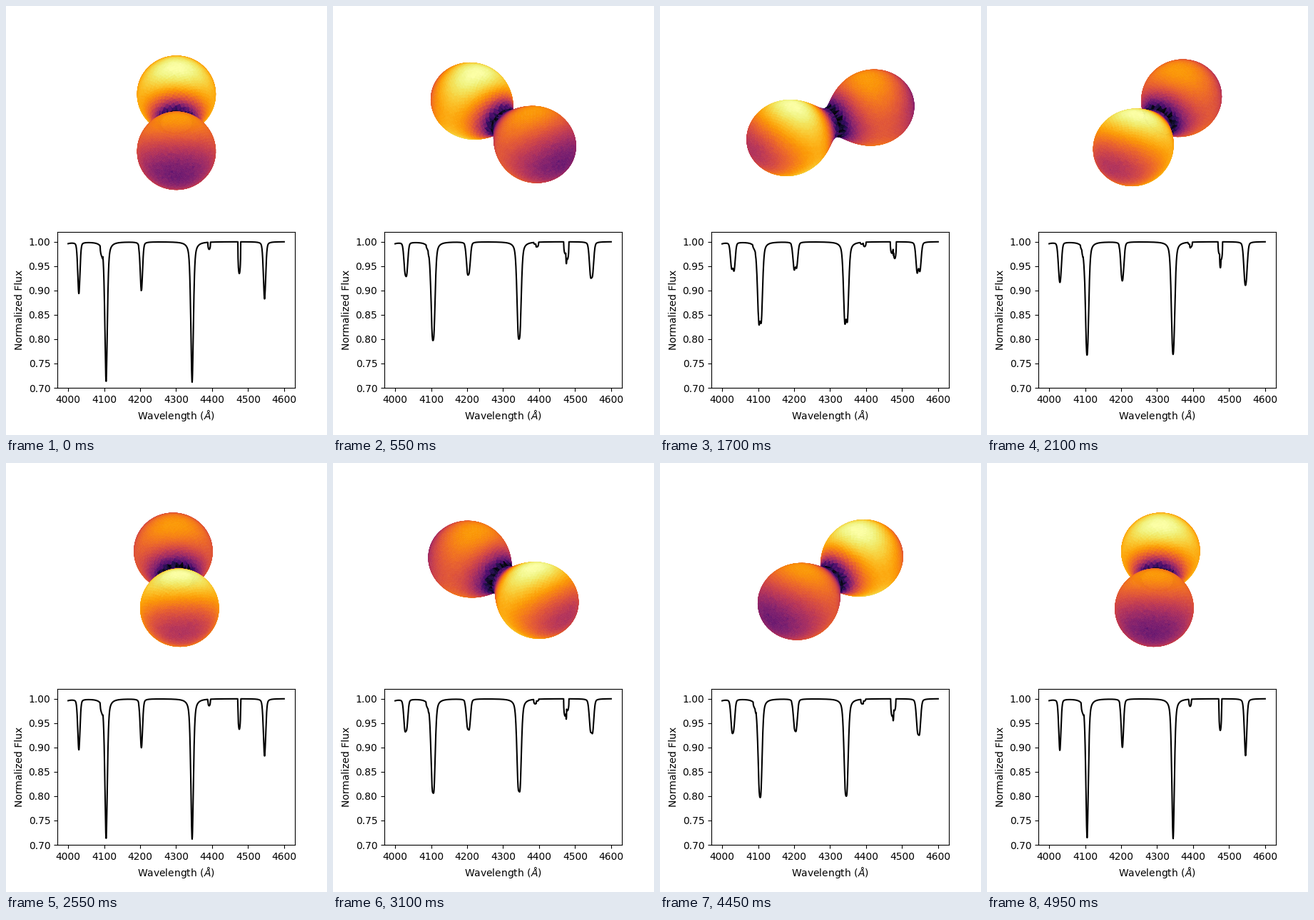
Write a matplotlib script that moves like this. It is 450 px wide and 600 px high and loops after 5 s.

```python
import numpy as np
import matplotlib.pyplot as plt
from matplotlib.animation import FuncAnimation
from matplotlib.collections import PolyCollection
from matplotlib.tri import Triangulation

FRAMES, INTERVAL = 100, 50
CENTER = np.array([238.9, 436.7])
SEPARATION = 137.0            # distance between the star centres in pixels
INCLINATION = np.radians(55.6)
SURFACE = 3.832               # potential of the shared envelope
COOL_RATIO = 0.885
DARKENING = 0.45
C_KMS = 299792.458
ORBIT_KMS = 315.0
SYSTEMIC = 1.0009

rng = np.random.default_rng(4)


# --- contact binary -------------------------------------------------------
def potential(s, v, z):
    """Roche potential of two equal masses at s = -0.5 and s = +0.5."""
    across = v**2 + z**2
    return (1 / np.sqrt((s - 0.5)**2 + across)
            + 1 / np.sqrt((s + 0.5)**2 + across) + s**2 + v**2)


def gradient(p):
    total = 2 * p * [1, 1, 0]
    for side in (-0.5, 0.5):
        d = p - [side, 0, 0]
        total -= d / np.linalg.norm(d, axis=1, keepdims=True)**3
    return total


def find_surface(value_at, low, high):
    for _ in range(40):
        mid = (low + high) / 2
        inside = value_at(mid) > SURFACE
        low, high = np.where(inside, mid, low), np.where(inside, high, mid)
    return (low + high) / 2


def half_envelope(count=1900, rim_count=30):
    """Points of one star, first axis towards the neck, and their triangles."""
    k = np.arange(count) + 0.5
    cos_a = 1 - 2 * k / count
    sin_a = np.sqrt(1 - cos_a**2)
    phi = k * np.pi * (3 - np.sqrt(5))
    rays = np.column_stack([cos_a, sin_a * np.cos(phi), sin_a * np.sin(phi)])

    def along(r, d):
        return potential(0.5 - r * d[:, 0], r * d[:, 1], r * d[:, 2])

    far = np.minimum(0.5 / np.maximum(cos_a, 0.1), 0.55)
    hits = along(far, rays) < SURFACE
    rays, far = rays[hits], far[hits]
    r = find_surface(lambda x: along(x, rays), np.full(len(far), 0.3), far)
    body = r[:, None] * rays
    body = body[body[:, 0] < 0.485]

    phi = np.arange(rim_count) * 2 * np.pi / rim_count
    rho = find_surface(
        lambda x: potential(0, x * np.cos(phi), x * np.sin(phi)),
        np.full(rim_count, 0.05), np.full(rim_count, 0.3))
    rim = np.column_stack([np.full(rim_count, 0.5),
                           rho * np.cos(phi), rho * np.sin(phi)])
    points = np.vstack([body, rim])

    # stereographic projection makes the flat triangulation wrap the star
    unit = points / np.linalg.norm(points, axis=1, keepdims=True)
    flat = unit[:, 1:] / (1 - unit[:, :1])
    return points, Triangulation(flat[:, 0], flat[:, 1]).triangles


points, triangles = half_envelope()
hot = (points * [-1, 1, 1] + [0.5, 0, 0])[triangles]
corners = np.concatenate([hot, hot * [-1, 1, 1]])
middle = corners.mean(axis=1)
pull = gradient(middle)
gravity = np.linalg.norm(pull, axis=1)
outward = -pull / gravity[:, None]

heat = gravity**DARKENING * np.where(middle[:, 0] > 0, 1, COOL_RATIO)
heat = (heat - heat.min()) / np.ptp(heat)
heat += rng.normal(size=len(heat)) * (0.004 + 0.05 * (1 - heat)**4)
colors = plt.get_cmap("inferno")(np.clip(heat, 0, 1))


def view(theta):
    """Rows: screen right, screen up, towards the viewer."""
    st, ct = np.sin(theta), np.cos(theta)
    si, ci = np.sin(INCLINATION), np.cos(INCLINATION)
    return np.array([[-st, ct, 0],
                     [ct * ci, st * ci, si],
                     [-ct * si, -st * si, ci]])


# --- spectrum -------------------------------------------------------------
wave = np.linspace(4000, 4600, 1201)

# rest wavelength, hot depth, cool depth, half width, Lorentz share
BROAD = [
    (3970.1, 0.145, 0.140, 4.15, 0.50),
    (4026.1, 0.050, 0.055, 3.60, 0.25),
    (4101.7, 0.146, 0.141, 4.10, 0.50),
    (4199.8, 0.052, 0.048, 3.65, 0.30),
    (4340.5, 0.147, 0.142, 4.20, 0.50),
    (4541.6, 0.061, 0.057, 3.80, 0.30),
]
# rest wavelength, hot depth, cool depth, half width
ROTATED = [
    (4089.0, 0.006, 0.009, 3.7),
    (4195.8, 0.002, 0.003, 3.7),
    (4387.9, 0.004, 0.010, 3.6),
    (4471.5, 0.026, 0.038, 3.9),
]


def voigt(x, share):
    return share / (1 + x**2) + (1 - share) * 0.5**(x**2)


def ellipse(x):
    return np.clip(1 - x**2, 0, None)**0.4


def spectrum(theta):
    flux = np.ones_like(wave)
    side = np.sin(theta)**2
    eclipse = 0.1 * np.cos(theta) * np.exp(-side / 0.09)
    for star, sign in ((1, -1), (2, 1)):
        shift = SYSTEMIC + sign * ORBIT_KMS * np.sin(theta) / C_KMS
        weight = 1 + sign * eclipse
        for line in BROAD:
            stretch = 1 + 0.05 * side
            x = (wave - line[0] * shift) / (line[3] * stretch)
            flux -= weight * line[star] / stretch * voigt(x, line[4])
        for line in ROTATED:
            stretch = 1 + 0.15 * side
            x = (wave - line[0] * shift) / (line[3] * stretch)
            flux -= weight * line[star] / stretch * ellipse(x)
    return flux


# --- figure ---------------------------------------------------------------
fig = plt.figure(figsize=(4.5, 6), dpi=100)

sky = fig.add_axes([0, 0, 1, 1])
sky.set(xlim=(0, 450), ylim=(0, 600))
sky.axis("off")
stars = PolyCollection([], edgecolors="face", linewidths=0.4)
sky.add_collection(stars, autolim=False)

chart = fig.add_axes([0.16, 0.11, 0.74, 218 / 600])
chart.set(xlim=(3970, 4630), ylim=(0.7, 1.02),
          xlabel=r"Wavelength ($\AA$)", ylabel="Normalized Flux")
curve, = chart.plot(wave, spectrum(0), color="black", lw=1.5)


def update(frame):
    theta = 2 * np.pi * frame / FRAMES
    axes = view(theta)
    shown = np.flatnonzero(outward @ axes[2] > -0.1)
    shown = shown[np.argsort(middle[shown] @ axes[2])]
    stars.set_verts(CENTER + SEPARATION * (corners[shown] @ axes[:2].T))
    stars.set_facecolor(colors[shown])
    curve.set_ydata(spectrum(theta))
    return stars, curve


anim = FuncAnimation(fig, update, frames=FRAMES, interval=INTERVAL,
                     repeat=True, repeat_delay=0)
plt.show()
```
